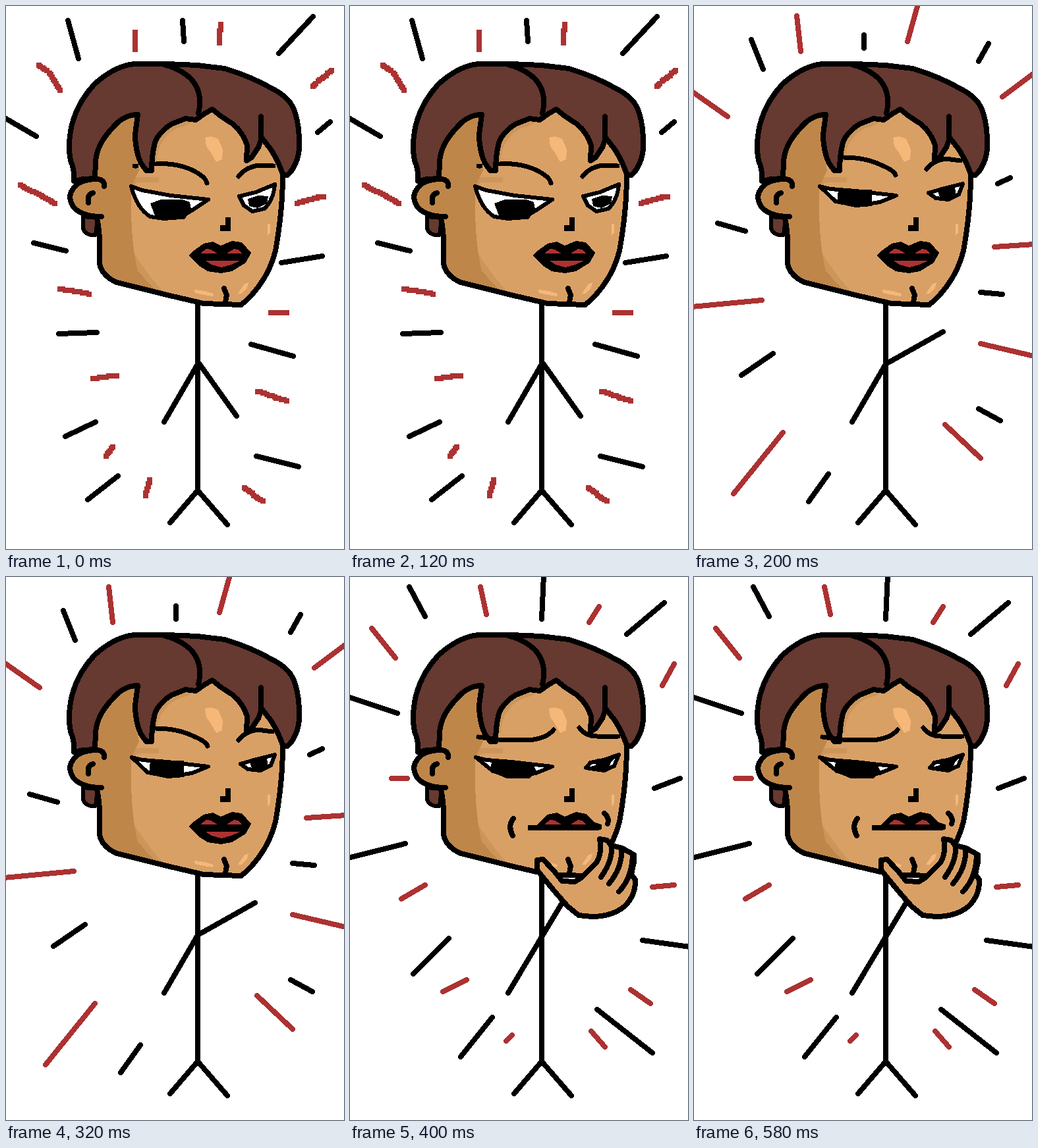
Recreate the animation shown at these times as an HTML page. Size 513 by 825 pixels, loop 700 ms.

```html
<!DOCTYPE html>
<html>
<head>
<meta charset="utf-8">
<title>Thinking pose</title>
<style>
html, body { margin: 0; width: 100%; height: 100%; overflow: hidden; background: #fff }
svg { display: block; width: 513px; height: 825px; shape-rendering: crispEdges }
path { fill: none; stroke: #000; stroke-width: 8; stroke-linecap: round; stroke-linejoin: round }
.skin { fill: #d9a066 }
.shade { fill: #bf864a }
.mid { fill: #cc965a }
.glow { fill: #f6b879 }
.hair { fill: #663931 }
.white { fill: #fff }
.black { fill: #000 }
.lip { fill: #ac3232 }
.flat { stroke: none }
.eye { stroke-width: 6 }
.red { stroke: #ac3232 }
.blocks { fill: #ac3232; stroke: none }
</style>
</head>
<body>
<svg viewBox="0 0 513 825">
  <defs>
    <g id="openMouth">
      <path class="black flat" d="M277 379L286 371 300 361 314 358 326 364 343 357 358 359 372 375 364 390 343 403 326 406 306 403 292 394 284 385Z"/>
      <path class="lip flat" d="M303 387H355L342 393 327 397 312 393Z"/>
    </g>
    <path id="upperLip" class="lip flat" d="M295 376L304 369 311 370 321 376ZM335 376L346 369 352 370 359 376Z"/>
    <path id="leftArm" d="M291 544L240 632"/>
  </defs>

  <path d="M291 455V736L249 785M291 736L336 788"/>

  <g id="head">
    <path class="skin flat" d="M138 322Q143 350 142 392Q146 410 168 420L240 438 300 452 357 454Q400 420 409 372Q420 310 420 258L432 150 200 100 110 240Z"/>
    <path class="mid flat" d="M190 260H232V268H200L192 275ZM191 370L202 388 222 415 242 438 200 430ZM225 240L224 200 270 165 290 172 275 181Q250 187 240 203Q229 216 229 235Z"/>
    <path class="shade flat" d="M110 240L198 150 193 210 202 250 190 275Q189 300 191 340Q194 380 200 402L217 422 231 436 168 420Q146 410 142 392Q143 350 138 322Z"/>
    <path class="glow flat" d="M302 200L311 198 322 202 329 218 328 233 319 237 311 223 304 213ZM397 331H401V345L397 348ZM286 431L301 433 315 437 314 441 301 439 287 436ZM352 437L362 422 368 420 366 428 357 437Z"/>
    <path class="hair" style="stroke-width:6" d="M117 320V338Q120 349 136 348L139 322Z"/>
    <path d="M138 322Q144 350 142 392Q146 410 168 420L240 438 300 452 357 454Q372 442 385 424Q402 400 409 372Q420 310 420 258"/>
    <path class="shade" d="M149 274Q150 264 139 263Q110 263 101 279Q93 290 102 305Q115 320 145 320"/>
    <path d="M132 284Q123 286 125 299"/>
    <path class="hair" d="M103 266Q104 248 98 235Q94 215 98 190Q105 150 135 118Q165 91 195 88H245L290 90 332 95Q372 107 405 126Q433 140 439 163Q446 185 445 217Q442 244 427 257L420 256Q414 237 402 218L388 200 383 215 373 230 365 235 366 212Q360 192 344 179L327 168 313 157 302 163 288 173 272 171 250 180Q228 195 225 212Q221 230 221 250H213L205 239Q196 220 196 195L200 165Q178 165 161 186Q138 210 136 236L135 262 117 263Z"/>
    <path d="M240 89Q263 95 279 109Q300 130 292 163M387 168V205"/>
    <path class="black flat" d="M333 321H341V342H325V333H333Z"/>
    <path d="M331 429L335 439 333 450"/>
  </g>

  <g class="pose">
    <path d="M94 22L110 80M268 22L270 54M466 16L414 72M-2 170L46 198M492 176L473 192M42 360L91 372M480 380L418 390M80 498L138 496M372 514L436 532M136 632L90 654M170 714L124 750M380 684L444 700"/>
    <path class="blocks" id="blocks"/>
    <use href="#leftArm"/>
    <path d="M293 543L350 623"/>
    <path style="stroke-width:7" d="M195 243H198M228 240Q258 238 282 249Q303 259 305 269M353 259Q363 245 384 242L406 243"/>
    <path class="white eye" d="M190 274L207 280 250 288 307 294 283 310 265 321 240 323 219 320Q199 308 190 274ZM354 289L379 283 408 271Q406 295 392 308L374 312 361 303Z"/>
    <path class="black flat" d="M219 300L235 294H268L279 298 281 308 271 324H228ZM367 293L383 288 398 289 396 300 382 307 369 304Z"/>
    <use href="#openMouth"/><use href="#upperLip"/>
  </g>

  <g class="pose">
    <path d="M87 51L105 96M258 44V64M447 57L432 84M480 261L461 270M36 330L78 342M435 435L468 438M120 528L72 561M432 612L465 630M204 711L174 753"/>
    <path class="red" d="M156 15L162 69M340 -3L324 54M-3 130L51 168M516 102L468 138M456 366L516 362M-3 457L103 447M435 513L516 532M381 636L435 687M135 648L60 741"/>
    <use href="#leftArm"/>
    <path d="M291 544L378 495"/>
    <path style="stroke-width:7" d="M228 230Q260 230 285 242Q304 250 306 257M353 248Q362 235 382 232L404 235"/>
    <path class="white eye" d="M191 274L207 278 245 281 307 288 282 298 248 303 215 297ZM356 284L380 277 408 270 402 286 386 294 367 292Z"/>
    <path class="black flat" d="M219 279H270V304L245 306 217 300ZM369 277L396 273 397 285 389 291H373Z"/>
    <use href="#openMouth"/><use href="#upperLip"/>
  </g>

  <g class="pose">
    <path d="M90 15L114 60M294 -3L291 64M477 39L420 87M-3 182L72 207M501 306L462 321M-3 427L84 405M444 552L516 562M150 549L96 603M216 669L168 729M375 657L459 723"/>
    <path class="red" d="M198 15L207 57M378 45L363 69M33 78L69 123M492 132L474 165M63 306H87M114 468L78 489M459 471L492 468M177 612L141 630M426 627L456 648M246 696L237 705M366 690L387 714"/>
    <path d="M322 495L240 632"/>
    <path style="stroke-width:7" d="M195 243L225 247 270 248Q298 246 309 232M348 229Q357 242 375 242H407"/>
    <path class="white eye" d="M191 274L207 278 245 281 307 288 282 298 248 303 217 295ZM358 290L365 282 385 278 408 270 401 287 386 294Z"/>
    <path class="black flat" d="M216 278L278 284 283 295 272 306H238L217 297 213 290ZM372 277L405 272 396 282 392 292H365V288L373 286Z"/>
    <path class="black flat" d="M270 377H283L300 361 314 358 326 364 343 357 358 360 372 373 382 376V383L376 385H270Z"/>
    <use href="#upperLip"/>
    <path d="M248 367Q239 378 247 393M386 359Q394 366 391 375"/>
    <path class="white flat" d="M316 457H350L340 466H325Z"/>
    <path class="skin" d="M284 430L293 429 309 446 322 462 341 463 351 457 374 434Q383 419 379 398L390 400 397 408 413 412 431 422V433L427 452 433 460Q434 483 417 500Q398 516 367 516L347 514 330 500 310 477 291 454 284 445Z"/>
    <path d="M396 406Q401 427 381 456M412 412Q414 441 393 466M429 424Q427 459 408 478"/>
  </g>
</svg>
<script>
const poses = [...document.querySelectorAll('.pose')];
const starts = [0, 200, 400], loop = 700;

// Chunky strokes: square stamps snapped to a coarse grid along each line.
const strokes = [
  [195, 39, 195, 65], [326, 28, 323, 56], [49, 90, 65, 101], [65, 101, 82, 128],
  [494, 98, 465, 122], [22, 272, 74, 299], [482, 289, 442, 299], [82, 430, 126, 437],
  [402, 465, 426, 465], [167, 561, 131, 566], [382, 585, 425, 600], [161, 670, 151, 683],
  [218, 720, 211, 743], [361, 732, 389, 752]
];
const snap = v => Math.round(v / 2) * 2 - 4;
let stamps = '';
for (const [x1, y1, x2, y2] of strokes) {
  const steps = Math.ceil(Math.hypot(x2 - x1, y2 - y1) / 4);
  for (let i = 0; i <= steps; i++) {
    const k = i / steps;
    stamps += `M${snap(x1 + (x2 - x1) * k)} ${snap(y1 + (y2 - y1) * k)}h8v8h-8z`;
  }
}
document.getElementById('blocks').setAttribute('d', stamps);

function draw() {
  const t = performance.now() % loop;
  const current = starts.findLastIndex(s => t >= s);
  poses.forEach((p, i) => p.style.display = i === current ? '' : 'none');
  requestAnimationFrame(draw);
}
draw();
</script>
</body>
</html>
```
